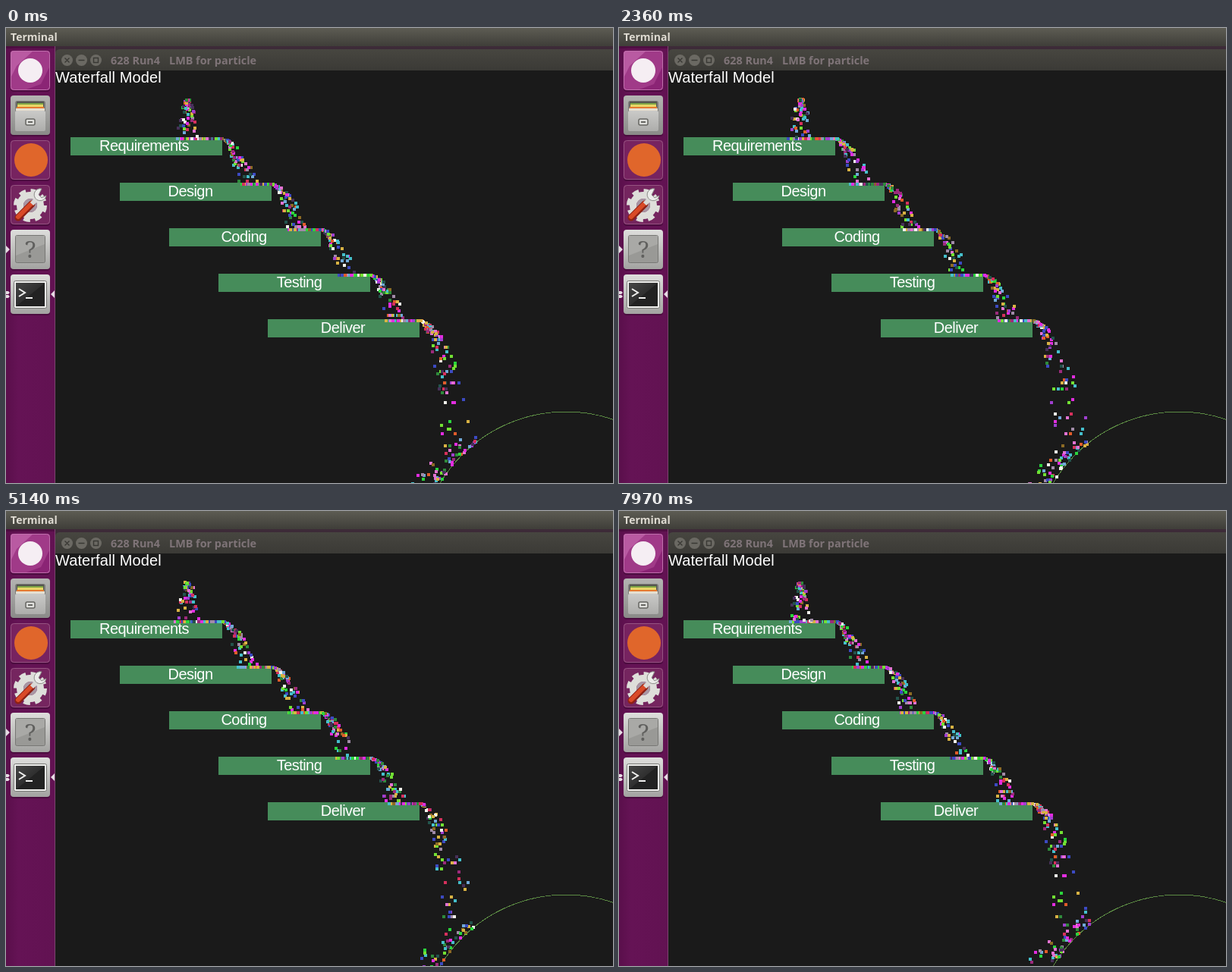
An HTML page with a canvas for the animation above (8000 ms loop, 800x600 px).

```html
<!DOCTYPE html>
<html lang="en">
<head>
<meta charset="utf-8">
<title>Waterfall Model</title>
<style>
  html, body { margin: 0; width: 100%; height: 100%; overflow: hidden; background: #1a1a1a; }
  svg, canvas { position: absolute; left: 0; top: 0; width: 800px; height: 600px; display: block; }
  .ui { font: 700 14px "Open Sans", "Noto Sans", sans-serif; }
  .gl { font: 20px "Liberation Sans", Arial, sans-serif; fill: #fff; }
  .step { text-anchor: middle; letter-spacing: -0.55px; }
</style>
</head>
<body>
<svg viewBox="0 0 800 600">
  <defs>
    <linearGradient id="panel" x2="0" y2="1">
      <stop stop-color="#5d5c53"/><stop offset="1" stop-color="#3f3e39"/>
    </linearGradient>
    <linearGradient id="title" x2="0" y2="1">
      <stop stop-color="#474640"/><stop offset="1" stop-color="#3b3a36"/>
    </linearGradient>
    <linearGradient id="dock">
      <stop stop-color="#5a0f4b"/><stop offset=".25" stop-color="#651355"/><stop offset="1" stop-color="#621252"/>
    </linearGradient>
    <linearGradient id="silver" x2="0" y2="1">
      <stop stop-color="#dededc"/><stop offset="1" stop-color="#a3a3a1"/>
    </linearGradient>
    <linearGradient id="grey" x2="0" y2="1">
      <stop stop-color="#b4b4b2"/><stop offset="1" stop-color="#8a8a88"/>
    </linearGradient>
    <linearGradient id="drawer" x2="0" y2="1">
      <stop stop-color="#cacac8"/><stop offset="1" stop-color="#adadab"/>
    </linearGradient>
    <linearGradient id="screen" x2="1" y2="1">
      <stop stop-color="#474747"/><stop offset=".5" stop-color="#2f2f2f"/><stop offset=".51" stop-color="#222"/>
    </linearGradient>
    <rect id="tile" width="52" height="52" rx="4"/>
  </defs>

  <rect width="800" height="600" fill="#1a1a1a"/>
  <rect x="65" y="24" width="735" height="32" fill="#3d2b38"/>
  <path d="M65 56V34q0-6 6-6H800V56Z" fill="url(#title)"/>
  <rect width="800" height="24" fill="url(#panel)"/>
  <text class="ui" x="6" y="17" fill="#dfdbd2">Terminal</text>

  <g fill="#6b6963" stroke="#393834" stroke-width="1.4">
    <circle cx="80.500" cy="42.500" r="7.500" stroke="none"/>
    <circle cx="99.500" cy="42.500" r="7.500" stroke="none"/>
    <circle cx="118.500" cy="42.500" r="7.500" stroke="none"/>
    <path d="M77.500 39.500l6 6m0-6l-6 6M95.500 42.500h8M115.500 39.500h6v6h-6z" fill="none"/>
  </g>
  <g class="ui" fill="#7f7478" style="font-size:14.4px">
    <text x="138" y="48">628 Run4</text>
    <text x="215" y="48">LMB for particle</text>
  </g>

  <rect y="24" width="65" height="576" fill="url(#dock)"/>
  <rect y="24" width="65" height="3" fill="#3d0a33" opacity=".5"/>
  <rect x="64" y="24" width="1" height="576" fill="#7d4470"/>

  <!-- dock tiles -->
  <g fill="#3d0933" opacity=".6" transform="translate(6 32)">
    <use href="#tile"/><use href="#tile" y="59"/><use href="#tile" y="118"/>
    <use href="#tile" y="177"/><use href="#tile" y="236"/><use href="#tile" y="295"/>
  </g>

  <g transform="translate(6 30)">
    <use href="#tile" fill="#a03a88"/>
    <path d="M4 0H30L8 20 0 36V4q0-4 4-4Z" fill="#b95aa2"/>
    <path d="M52 20V48q0 4-4 4H18L40 44Z" fill="#8b2475"/>
    <circle cx="26" cy="26" r="16" fill="#f5eef3"/>
    <rect x=".5" y=".5" width="51" height="51" rx="4" fill="none" stroke="#c070ad"/>
  </g>

  <g transform="translate(6 89)">
    <use href="#tile" fill="url(#grey)"/>
    <rect x="6" y="7" width="40" height="40" rx="3" fill="#7c7c79"/>
    <rect x="8" y="8" width="36" height="13" fill="#54544f"/>
    <path d="M9 10h34v3H9z" fill="#7ea545"/>
    <path d="M9 12h34v3H9z" fill="#e9d567"/>
    <path d="M8 15h36v3H8z" fill="#e57a30"/>
    <path d="M7 17h38v3H7z" fill="#e6dfd0"/>
    <rect x="6" y="20" width="40" height="27" rx="2" fill="url(#drawer)"/>
    <rect x="20" y="31" width="12" height="8" rx="2" fill="#dededb" stroke="#666662" stroke-width="1.5"/>
    <path d="M23 35h6" stroke="#666662" stroke-width="2"/>
  </g>

  <g transform="translate(6 148)">
    <use href="#tile" fill="#772360"/>
    <rect x=".5" y=".5" width="51" height="51" rx="4" fill="none" stroke="#965482"/>
    <circle cx="27" cy="26" r="22" fill="#e0662b"/>
  </g>

  <g transform="translate(6 207)">
    <use href="#tile" fill="#75255f"/>
    <rect x=".5" y=".5" width="51" height="51" rx="4" fill="none" stroke="#965482"/>
    <circle cx="26" cy="27" r="19" fill="none" stroke="#dededa" stroke-width="6" stroke-dasharray="8.500 6.423"/>
    <circle cx="26" cy="27" r="13.500" fill="none" stroke="#dededa" stroke-width="9"/>
    <circle cx="26" cy="27" r="9" fill="#a997a4"/>
    <path d="M10 43L28 25" stroke="#8e2114" stroke-width="9" stroke-linecap="round"/>
    <path d="M10 42L28 24" stroke="#d94a27" stroke-width="6" stroke-linecap="round"/>
    <path d="M28 25l8-8" stroke="#d9d9d6" stroke-width="6"/>
    <path d="M41 5a8 8 0 1 0 6 9l-6 3-4-4Z" fill="#ececea" stroke="#8b8b88"/>
  </g>

  <g transform="translate(6 266)">
    <use href="#tile" fill="url(#silver)"/>
    <rect x="6.500" y="7.500" width="39" height="36" rx="2" fill="#999996" stroke="#777774"/>
    <path d="M7 8H45V19L7 34Z" fill="#a9a9a6"/>
    <text x="26" y="37" text-anchor="middle" fill="#60605e" style="font:31px 'Noto Serif',serif">?</text>
  </g>

  <g transform="translate(6 325)">
    <use href="#tile" fill="url(#silver)"/>
    <rect x="4.500" y="8.500" width="43" height="36" rx="2" fill="#f0f0ee" stroke="#777774"/>
    <rect x="7" y="11" width="38" height="31" fill="url(#screen)"/>
    <path d="M11 19l8 5-8 5M20 31h9" fill="none" stroke="#f2f2f0" stroke-width="2"/>
  </g>

  <path d="M0 287l5 5-5 5ZM64 346l-5 5 5 5ZM0 347h3l2 2-2 2H0ZM0 352h3l2 2-2 2H0Z" fill="#e6dce4"/>

  <text class="gl" x="65" y="72" letter-spacing=".1">Waterfall Model</text>
  <g id="steps"></g>
  <circle cx="738" cy="699" r="193" fill="none" stroke="#5b8a43" shape-rendering="crispEdges"/>
</svg>
<canvas id="spray" width="800" height="600"></canvas>

<script>
const LOOP = 8000, STEPS = 480, REDRAWS = 167, COUNT = 860;
const GRAVITY = 0.1, FRICTION = 0.25;
const BALL = { x: 738, y: 699, r: 193 };
const COLORS = ['#45bfcb', '#3c4ac2', '#e22de0', '#2bd53c', '#d8b243', '#e05c2a', '#d6305c', '#a03fd0',
  '#a18ba8', '#f0f0ea', '#2e8a3b', '#72e033', '#e272d2', '#8c6b24', '#47305a', '#23544c',
  '#45bfcb', '#3c4ac2', '#d8b243', '#e22de0', '#9c2a7c', '#70a9d8'];

// labels sit slightly off the middle of their ledges
const labels = [['Requirements', 182], ['Design', 243], ['Coding', 313.5], ['Testing', 386.5], ['Deliver', 444]];
document.getElementById('steps').innerHTML = labels.map(([word, cx], i) =>
  `<rect x="${85 + 65 * i}" y="${144 + 60 * i}" width="200" height="24" fill="#468c5a"/>
   <text class="gl step" x="${cx}" y="${162 + 60 * i}">${word}</text>`).join('');

let seed = 20177;
function rand() {
  seed = (seed + 0x6d2b79f5) | 0;
  let h = Math.imul(seed ^ (seed >>> 15), seed | 1);
  h ^= h + Math.imul(h ^ (h >>> 7), h | 61);
  return ((h ^ (h >>> 14)) >>> 0) / 4294967296;
}
const slideSpeed = () => 0.53 + 0.9 * rand();

// velocity after hitting a surface with unit normal (nx, ny)
function rebound(vx, vy, nx, ny, bounce) {
  const into = Math.min(0, vx * nx + vy * ny);
  const along = vy * nx - vx * ny;
  const kept = Math.sign(along) * Math.max(0, Math.abs(along) + FRICTION * into);
  const out = into < 0 ? -bounce * into : vx * nx + vy * ny;
  return [out * nx - kept * ny, out * ny + kept * nx];
}

// position at every step of one drop's life
function trace() {
  const path = [];
  const bounce = 0.1 + 0.25 * rand();
  let x = 237 + 4 * rand(), y = 95;
  let vx = rand() - 0.5, vy = rand() - 0.5;
  let ledge = 0, speed = slideSpeed();
  while (y < 603 && path.length < 1200) {
    path.push([Math.round(x), Math.round(y)]);
    vy += GRAVITY;
    x += vx;
    y += vy;
    if (ledge < labels.length) {
      const top = 146 + 60 * ledge;
      if (x > 286 + 65 * ledge) {
        ledge++;
        speed = slideSpeed();
      } else if (y > top) {
        y = top;
        vy = 0;
        vx += (speed - vx) * 0.25;
      }
      continue;
    }
    const dx = x - BALL.x, dy = y - BALL.y, d = Math.hypot(dx, dy);
    if (d < BALL.r) {
      const nx = dx / d, ny = dy / d;
      [vx, vy] = rebound(vx, vy, nx, ny, bounce);
      x = BALL.x + nx * BALL.r;
      y = BALL.y + ny * BALL.r;
    }
  }
  return path;
}

const drops = Array.from({ length: COUNT }, (_, i) => ({
  born: Math.floor(i * STEPS / COUNT),
  color: COLORS[Math.floor(rand() * COLORS.length)],
  path: trace()
}));

const ctx = document.getElementById('spray').getContext('2d');
let shown = -1;

function draw(step) {
  ctx.clearRect(0, 0, 800, 600);
  for (const { born, color, path } of drops) {
    ctx.fillStyle = color;
    for (let age = (step - born + STEPS) % STEPS; age < path.length; age += STEPS) {
      const [x, y] = path[age];
      ctx.fillRect(x - 2, y - 2, 4, 4);
    }
  }
}

function tick() {
  const redraw = Math.floor((performance.now() % LOOP) * REDRAWS / LOOP);
  if (redraw !== shown) {
    shown = redraw;
    draw(Math.floor(redraw * STEPS / REDRAWS));
  }
  requestAnimationFrame(tick);
}
tick();
</script>
</body>
</html>
```
